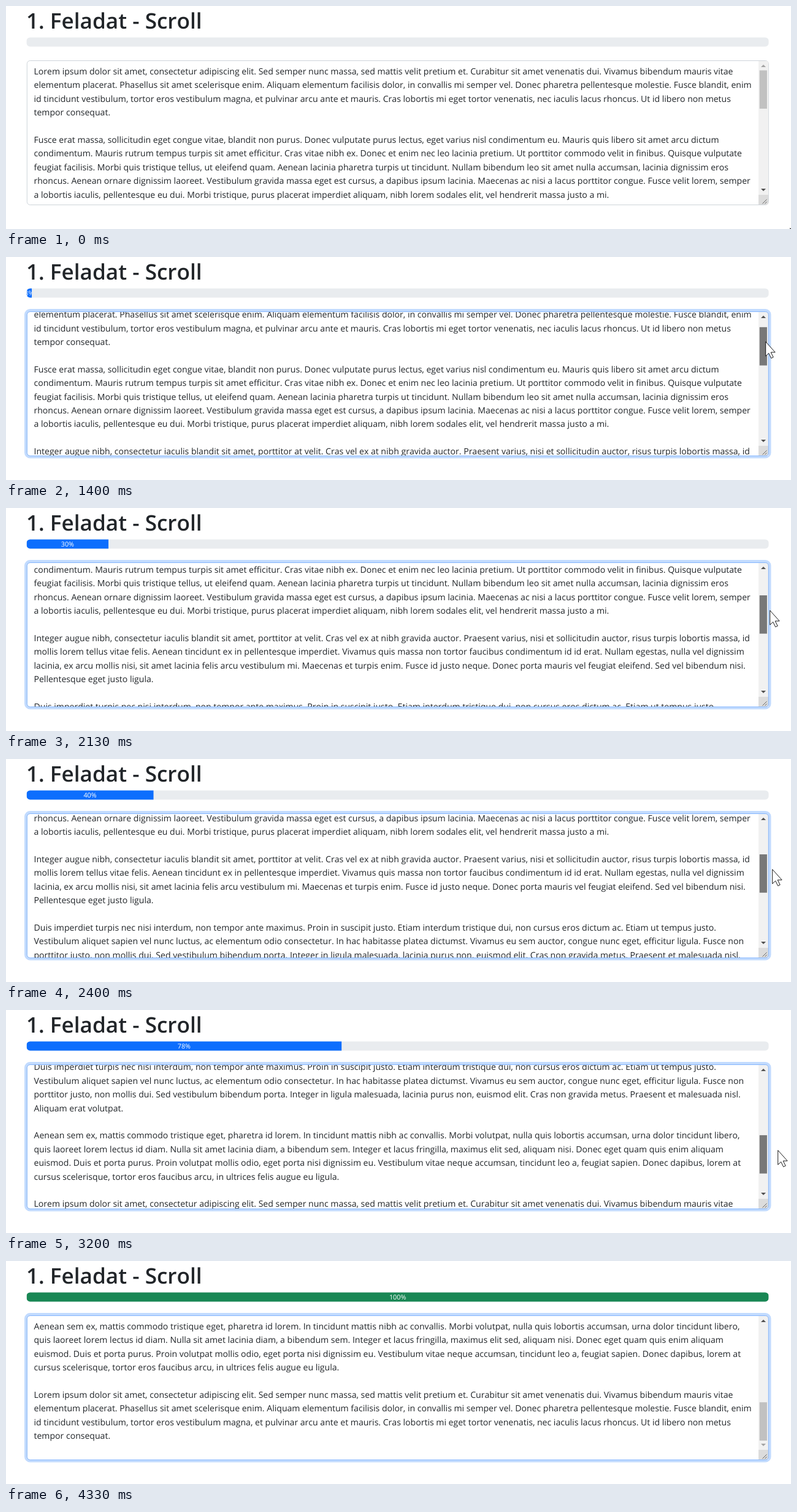
Recreate the animation shown at these times as an HTML page. Size 1280 by 365 pixels, loop 5.47 s.

```html
<!DOCTYPE html>
<html lang="hu">
<head>
<meta charset="utf-8">
<title>Scroll</title>
<style>
  html, body { margin: 0; width: 100%; height: 100%; overflow: hidden; background: #fff; }
  svg { display: block; width: 1280px; height: 365px; }
  text { font-family: "Open Sans", "Noto Sans", sans-serif; fill: #212529; text-rendering: geometricPrecision; font-kerning: none; }
  #title { font-size: 35.15px; font-weight: 600; }
  #rows text { font-size: 14.07px; }
  #label { font-size: 10.8px; fill: #fff; text-anchor: middle; }
</style>
</head>
<body>
<svg viewBox="0 0 1280 365">
  <clipPath id="pill"><rect x="33.6" y="51.4" width="1210" height="15" rx="5.6"/></clipPath>
  <clipPath id="filled"><rect class="fill" x="33.6" y="51" height="16"/></clipPath>
  <clipPath id="view"><rect x="35" y="90" width="1192" height="235" rx="4.6"/></clipPath>

  <text id="title" x="33" y="36.6">1. Feladat - Scroll</text>

  <g clip-path="url(#pill)">
    <rect x="33" y="51" width="1211" height="16" fill="#e9ecef"/>
    <rect id="bar" class="fill" x="33.6" y="51" height="16"/>
    <g clip-path="url(#filled)"><text id="label" y="63"></text></g>
  </g>

  <rect id="ring" x="30" y="85" width="1217.5" height="244.5" rx="9.3" fill="#c2dbfe"/>
  <rect x="34.3" y="89.5" width="1209" height="236" rx="5.1" fill="#fff" stroke="#ced4da"/>
  <g id="rows" clip-path="url(#view)"></g>

  <path d="M1227 90h12q4 0 4 4v231h-16z" fill="#f1f1f1"/>
  <path id="up" d="M1231 100h8l-4-4z"/>
  <path id="down" d="M1231 299h8l-4 4z"/>
  <rect id="thumb" x="1228.7" width="12.2" height="62.7"/>
  <path d="M1227 309h16v12q0 4-4 4h-12z" fill="#dcdcdc"/>
  <path d="M1233.5 323.5l7-7m-3 7l3-3" stroke="#666"/>
  <rect id="focus" x="34.3" y="89.5" width="1209" height="236" rx="5.1" fill="none" stroke="#86b7fe"/>

  <path id="cursor" d="M0 0v23.5l5-4.7 4 8.2 3.5-1.7-4-8h7z" fill="#fff" stroke="#000" stroke-width=".9"/>
</svg>
<script>
const LOOP = 5470, LINE = 22.4, MAX_SCROLL = 470.5;
const GRAB = 1000, FULL = 3570, RELEASE = 4000;

const opening = `Lorem ipsum dolor sit amet, consectetur adipiscing elit. Sed semper nunc massa, sed mattis velit pretium et. Curabitur sit amet venenatis dui. Vivamus bibendum mauris vitae
elementum placerat. Phasellus sit amet scelerisque enim. Aliquam elementum facilisis dolor, in convallis mi semper vel. Donec pharetra pellentesque molestie. Fusce blandit, enim
id tincidunt vestibulum, tortor eros vestibulum magna, et pulvinar arcu ante et mauris. Cras lobortis mi eget tortor venenatis, nec iaculis lacus rhoncus. Ut id libero non metus
tempor consequat.`;

const lines = `${opening}

Fusce erat massa, sollicitudin eget congue vitae, blandit non purus. Donec vulputate purus lectus, eget varius nisl condimentum eu. Mauris quis libero sit amet arcu dictum
condimentum. Mauris rutrum tempus turpis sit amet efficitur. Cras vitae nibh ex. Donec et enim nec leo lacinia pretium. Ut porttitor commodo velit in finibus. Quisque vulputate
feugiat facilisis. Morbi quis tristique tellus, ut eleifend quam. Aenean lacinia pharetra turpis ut tincidunt. Nullam bibendum leo sit amet nulla accumsan, lacinia dignissim eros
rhoncus. Aenean ornare dignissim laoreet. Vestibulum gravida massa eget est cursus, a dapibus ipsum lacinia. Maecenas ac nisi a lacus porttitor congue. Fusce velit lorem, semper
a lobortis iaculis, pellentesque eu dui. Morbi tristique, purus placerat imperdiet aliquam, nibh lorem sodales elit, vel hendrerit massa justo a mi.

Integer augue nibh, consectetur iaculis blandit sit amet, porttitor at velit. Cras vel ex at nibh gravida auctor. Praesent varius, nisi et sollicitudin auctor, risus turpis lobortis massa, id
mollis lorem tellus vitae felis. Aenean tincidunt ex in pellentesque imperdiet. Vivamus quis massa non tortor faucibus condimentum id id erat. Nullam egestas, nulla vel dignissim
lacinia, ex arcu mollis nisi, sit amet lacinia felis arcu vestibulum mi. Maecenas et turpis enim. Fusce id justo neque. Donec porta mauris vel feugiat eleifend. Sed vel bibendum nisi.
Pellentesque eget justo ligula.

Duis imperdiet turpis nec nisi interdum, non tempor ante maximus. Proin in suscipit justo. Etiam interdum tristique dui, non cursus eros dictum ac. Etiam ut tempus justo.
Vestibulum aliquet sapien vel nunc luctus, ac elementum odio consectetur. In hac habitasse platea dictumst. Vivamus eu sem auctor, congue nunc eget, efficitur ligula. Fusce non
porttitor justo, non mollis dui. Sed vestibulum bibendum porta. Integer in ligula malesuada, lacinia purus non, euismod elit. Cras non gravida metus. Praesent et malesuada nisl.
Aliquam erat volutpat.

Aenean sem ex, mattis commodo tristique eget, pharetra id lorem. In tincidunt mattis nibh ac convallis. Morbi volutpat, nulla quis lobortis accumsan, urna dolor tincidunt libero,
quis laoreet lorem lectus id diam. Nulla sit amet lacinia diam, a bibendum sem. Integer et lacus fringilla, maximus elit sed, aliquam nisi. Donec eget quam quis enim aliquam
euismod. Duis et porta purus. Proin volutpat mollis odio, eget porta nisi dignissim eu. Vestibulum vitae neque accumsan, tincidunt leo a, feugiat sapien. Donec dapibus, lorem at
cursus scelerisque, tortor eros faucibus arcu, in ultrices felis augue eu ligula.

${opening}`.split("\n");

// time, scroll offset, percent, bar width in percent, cursor x
const drag = [
  [GRAB, 0, 0, 0, 1236.5],
  [1400, 35.2, 7.7, 0.7, 1239],
  [1870, 98, 21, 6.2, 1243],
  [2400, 189.5, 40.2, 17.1, 1250],
  [2930, 301.5, 63.2, 31.85, 1256],
  [3530, 462.5, 98.2, 56.7, 1263],
  [FULL, MAX_SCROLL, 100, 59, 1263.5]
];
// time, cursor x, cursor y
const arrive = [[0, 1279, 364], [200, 1254, 224], [400, 1239, 145], [530, 1236.5, 133.5]];
const leave = [[FULL, 1263.5, 256], [3930, 1268, 271], [RELEASE, 1268, 273], [4270, 1278, 352], [4330, 1283, 371]];

const $ = id => document.getElementById(id);
const clamp = (v, lo, hi) => Math.min(hi, Math.max(lo, v));

// Smooth curve through the keys, clamped at both ends.
function follow(keys, time, column) {
  const last = keys.length - 1;
  const t = clamp(time, keys[0][0], keys[last][0]);
  if (t >= keys[last][0]) return keys[last][column];
  const i = keys.findIndex(k => k[0] > t) - 1;
  const slope = n => {
    const a = keys[Math.max(n - 1, 0)], b = keys[Math.min(n + 1, last)];
    return (b[column] - a[column]) / (b[0] - a[0]);
  };
  const span = keys[i + 1][0] - keys[i][0], u = (t - keys[i][0]) / span, w = 1 - u;
  return keys[i][column] * w * w * (1 + 2 * u) + keys[i + 1][column] * u * u * (3 - 2 * u)
    + span * u * w * (slope(i) * w - slope(i + 1) * u);
}

// The CSS "ease" curve, cubic-bezier(.25, .1, .25, 1).
function ease(x) {
  if (x <= 0 || x >= 1) return clamp(x, 0, 1);
  const bezier = (s, a, b) => 3 * s * (1 - s) * (1 - s) * a + 3 * s * s * (1 - s) * b + s ** 3;
  let lo = 0, hi = 1;
  for (let n = 0; n < 20; n++) {
    const mid = (lo + hi) / 2;
    if (bezier(mid, 0.25, 0.25) < x) lo = mid; else hi = mid;
  }
  return bezier(lo, 0.1, 1);
}

const rows = lines.map(line => {
  const row = document.createElementNS("http://www.w3.org/2000/svg", "text");
  row.setAttribute("x", 45.5);
  row.textContent = line;
  return $("rows").appendChild(row);
});

function cursorAt(t, scroll) {
  if (t < 800) return [follow(arrive, t, 1), follow(arrive, t, 2)];
  if (t < FULL) return [follow(drag, t, 4), 130 + scroll * 0.2675];
  return [follow(leave, t, 1), follow(leave, t, 2)];
}

function draw(t) {
  const scroll = follow(drag, t, 1);
  const percent = Math.round(follow(drag, t, 2));
  const start = Math.max(0, follow(drag, t, 3));
  const width = 12.1 * (start + (100 - start) * ease((t - FULL) / 600));

  document.querySelectorAll(".fill").forEach(r => r.setAttribute("width", width));
  $("bar").setAttribute("fill", percent >= 80 ? "#198754" : "#0d6efd");
  $("label").textContent = percent + "%";
  $("label").setAttribute("x", 33.6 + width / 2);

  rows.forEach((row, i) => row.setAttribute("y", Math.round(112 + i * LINE - scroll)));

  const dragging = t >= GRAB && t < RELEASE, hovering = t >= 530 && t < GRAB;
  $("thumb").setAttribute("y", 105.4 + scroll * 0.2675);
  $("thumb").setAttribute("fill", dragging ? "#787878" : hovering ? "#a8a8a8" : "#c1c1c1");
  $("up").setAttribute("fill", scroll > 0 ? "#505050" : "#a3a3a3");
  $("down").setAttribute("fill", scroll < MAX_SCROLL ? "#505050" : "#a3a3a3");

  const focus = ease((t - 960) / 150) * (t >= GRAB);
  $("ring").setAttribute("opacity", focus);
  $("focus").setAttribute("opacity", focus);

  const [x, y] = cursorAt(t, scroll).map(v => Math.round(v) - 0.3);
  $("cursor").setAttribute("transform", `translate(${x} ${y})`);
}

// Fifteen steps a second, on a 10 ms clock.
const origin = performance.now();
function tick() {
  const ms = (performance.now() - origin) % LOOP;
  const step = Math.floor((ms + 3.4) * 0.015);
  draw(Math.round(step / 0.15) * 10);
  requestAnimationFrame(tick);
}
tick();
</script>
</body>
</html>
```
